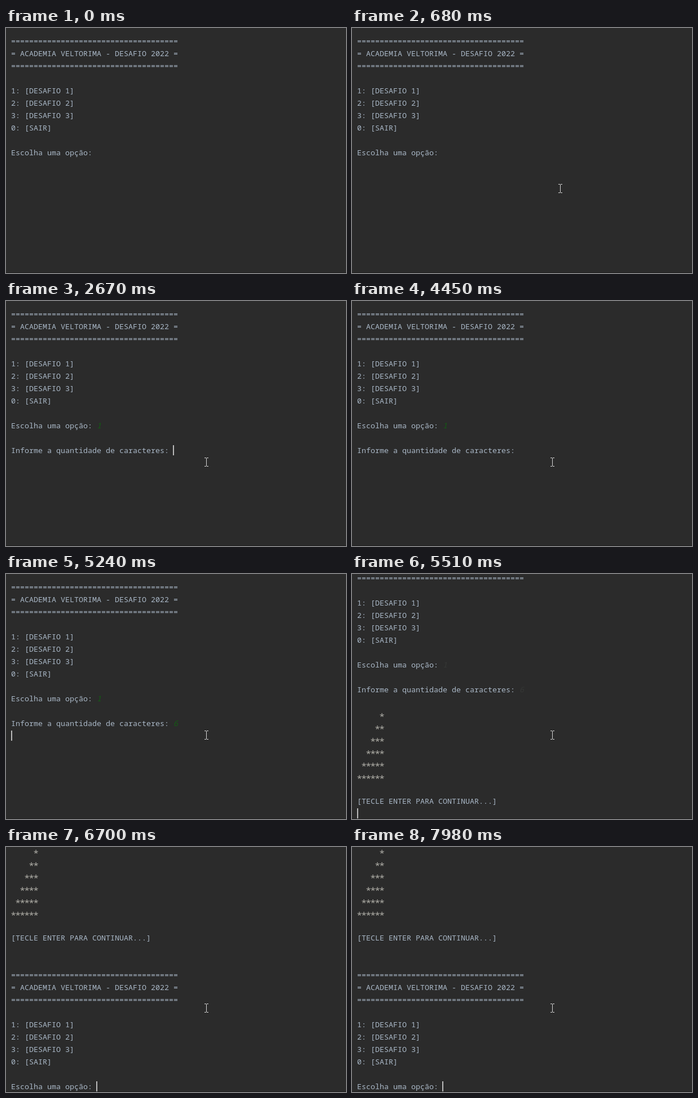
An HTML page for the animation above (8000 ms loop, 603 px wide and 435 px high).

```html
<!DOCTYPE html>
<html lang="pt">
<head>
<meta charset="utf-8">
<style>
  html, body { margin: 0; width: 100%; height: 100%; overflow: hidden; background: #2b2b2b; }
  #stage { position: relative; width: 603px; height: 435px; overflow: hidden; }
  #stage > * { position: absolute; }
  #edge { left: 0; top: 434px; width: 603px; height: 1px; background: #1f1f1f; }
  pre { margin: 0; left: 9px; color: #a9b7c6; font: 13.3333px/22px "Noto Sans Mono", monospace; font-variant-ligatures: none; }
  pre i { color: var(--input); }
  pre b { position: relative; left: -1.1px; top: 6px; font-weight: 400; font-size: 17px; line-height: 0; letter-spacing: -2.2px; color: #aeada6; }
  #caret { width: 2px; height: 18px; background: #bbb; }
  #mouse { left: 0; top: 0; }
</style>
</head>
<body>
<div id="stage">
  <div id="edge"></div>
  <pre id="text"></pre>
  <div id="caret"></div>
  <svg id="mouse" width="7" height="16"><path d="M0 .5H3M4 .5H7M3.5 1V15M0 15.5H3M4 15.5H7" fill="none" stroke="#d8d8d8"/></svg>
</div>
<script>
const $ = id => document.getElementById(id);
const LOOP = 8000, STEP = 69;

const rule = "=".repeat(37);
const menu = [rule, "= ACADEMIA VELTORIMA - DESAFIO 2022 =", rule, "",
  "1: [DESAFIO 1]", "2: [DESAFIO 2]", "3: [DESAFIO 3]", "0: [SAIR]", "",
  "Escolha uma opção: "].join("\n");
const stairs = Array.from({ length: 6 }, (_, i) =>
  " ".repeat(5 - i) + `<b>${"*".repeat(i + 1)}</b>`).join("\n");

// Console output: [time, text appended]
const output = [
  [0, menu],
  [1880, "<i>1</i>"],
  [2670, "\n\nInforme a quantidade de caracteres: "],
  [4910, "<i>6</i>"],
  [5510, "\n\n" + stairs + "\n\n[TECLE ENTER PARA CONTINUAR...]"],
  [6630, "\n\n\n" + menu]
];
const scroll = [[0, 0], [5510, 60], [6630, 140], [6700, 302]];
const inputColor = [[0, "#1b4d1b"], [2400, "#145c14"], [5510, "#363836"], [6630, "#145c14"]];

// Caret: [time, row, column]; no row means hidden
const carets = [
  [0], [820, 9, 19], [1880, 9, 20], [2400], [2470, 10, 0], [2670, 11, 36],
  [3460], [3980, 11, 36], [4450], [4910, 11, 37], [5240, 12, 0],
  [5510, 21, 0], [6440], [6700, 32, 19], [7430], [7980, 32, 19]
];

const at = (keys, t) => keys.filter(k => k[0] <= t).pop();

function mouseAt(t) {
  if (t < 200) return [-20, -20];
  if (t >= 1150) return [352, 278];
  if (t >= 1085) return [348, 267];
  if (t >= 1020) return [357, 271];
  const n = Math.floor((t - 200) / STEP + 0.05);
  if (n > 7) return [365, 276];
  const ease = 1 - (1 - n / 7) ** 2.5;
  return [Math.round(556 - 190 * ease), Math.round(424 - 147 * ease)];
}

let shown = "";
function draw() {
  const t = performance.now() % LOOP;
  const top = at(scroll, t)[1];
  const html = output.filter(o => o[0] <= t).map(o => o[1]).join("");
  if (html !== shown) $("text").innerHTML = shown = html;
  $("text").style.top = 12 - top + "px";
  $("text").style.setProperty("--input", at(inputColor, t)[1]);

  const [, row, col] = at(carets, t);
  const caret = $("caret").style;
  caret.display = row === undefined ? "none" : "block";
  caret.left = (col ? col * 8 + 8 : 9) + "px";
  caret.top = row * 22 + 14 - top + "px";

  const [x, y] = mouseAt(t);
  $("mouse").style.transform = `translate(${x}px, ${y}px)`;
  requestAnimationFrame(draw);
}
draw();
</script>
</body>
</html>
```
